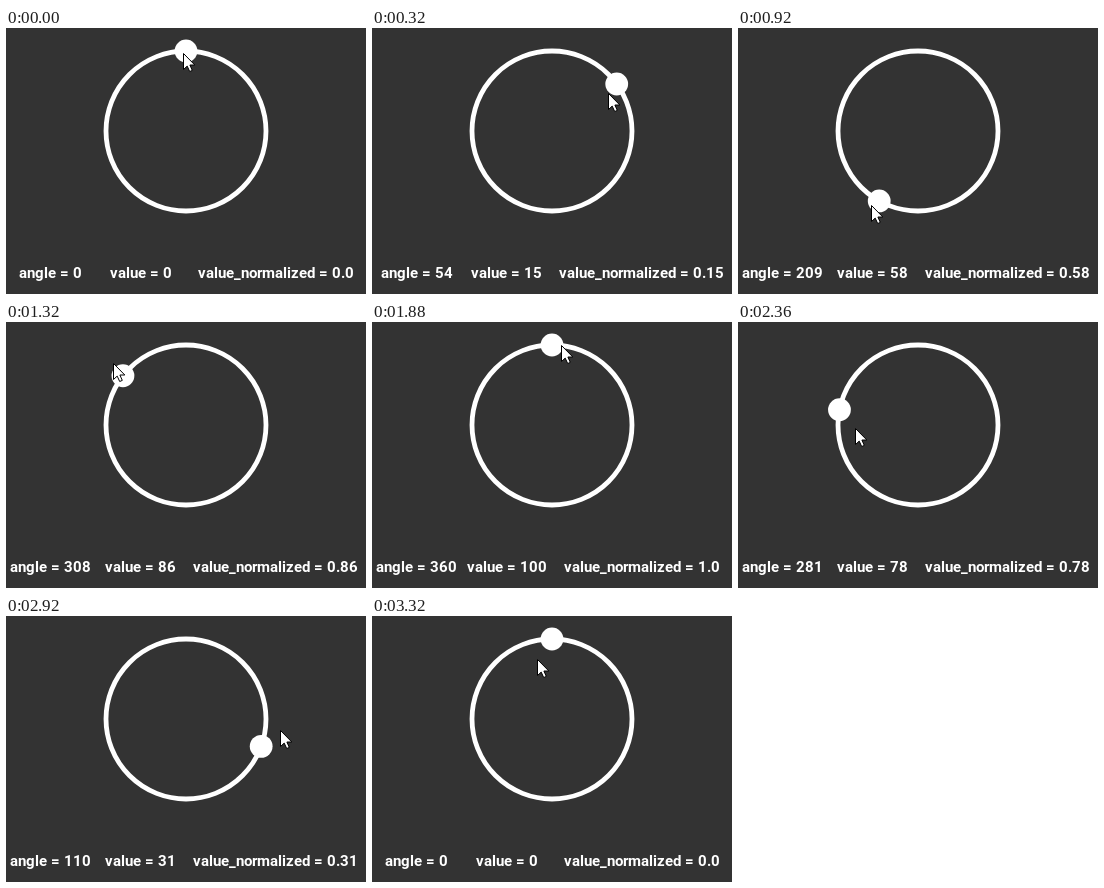
These frames come from a looping animation (360x266 px, 3.6 s). An HTML page with a canvas:

```html
<!DOCTYPE html>
<html lang="en">
<head>
<meta charset="utf-8">
<title>Circular slider</title>
<style>
  html, body { margin: 0; width: 360px; height: 266px; overflow: hidden; background: #333; }
  canvas { display: block; }
</style>
</head>
<body>
<canvas id="stage" width="360" height="266"></canvas>
<script>
const ctx = document.getElementById("stage").getContext("2d");
const LOOP = 3600, STEP = 40, TURN_BACK = 2120;
const CENTER = { x: 180, y: 103 }, RADIUS = 80;

const clamp = (v, low, high) => Math.min(high, Math.max(low, v));

// Linear path through [time, value] points.
function along(points, t) {
  const i = clamp(points.findIndex(p => p[0] > t), 1, points.length - 1);
  const [t0, v0] = points[i - 1], [t1, v1] = points[i];
  return v0 + (v1 - v0) * clamp((t - t0) / (t1 - t0), 0, 1);
}

// Clockwise drag with a soft start and stop, then a short nudge of the pointer.
function dragForward(t) {
  const u = clamp((t - 40) / 1552, 0, 1);
  const wave = Math.sin(2 * Math.PI * u);
  const angle = 360 * (u - 0.034 * wave);
  const nudge = clamp((t - 1840) / STEP, 0, 2);
  return {
    angle,
    turn: angle + 3 - 4.5 * Math.exp(-12 * u) + 4.2 * nudge,
    reach: 78 + 8 * u - 11.7 * wave - 5 * Math.min(nudge, 1)
  };
}

// Steady drag back, with the pointer ahead of the knob.
function dragBack(t) {
  const angle = clamp(354 - 0.305 * (t - TURN_BACK), 0, 360);
  const reach = along([[2080, 81], [2360, 62], [2920, 96], [3320, 85]], t);
  return { angle, turn: angle - 13.5, reach };
}

function polar(degrees, radius) {
  const rad = degrees * Math.PI / 180;
  return { x: CENTER.x + radius * Math.sin(rad), y: CENTER.y - radius * Math.cos(rad) };
}

function circle({ x, y }, radius) {
  ctx.beginPath();
  ctx.arc(x, y, radius, 0, Math.PI * 2);
}

// Centred text whose letters advance by whole pixels.
function label(text, center) {
  const widths = [...text].map(c => Math.round(ctx.measureText(c).width));
  let x = Math.floor(center - widths.reduce((sum, w) => sum + w) / 2);
  widths.forEach((width, i) => {
    ctx.fillText(text[i], x, 250);
    x += width;
  });
}

function drawPointer({ x, y }) {
  ctx.save();
  ctx.translate(Math.round(x) - 0.5, Math.round(y) + 0.5);
  const arrow = new Path2D("M0 0V16L3.7 12.6 6.2 18 8.8 16.9 6.4 11.5H11.3Z");
  ctx.fillStyle = "#fff";
  ctx.strokeStyle = "#000";
  ctx.fill(arrow);
  ctx.stroke(arrow);
  ctx.restore();
}

function decimal(value) {
  const rounded = Number(value.toFixed(2));
  return Number.isInteger(rounded) ? rounded + ".0" : String(rounded);
}

function draw(ms) {
  const t = Math.floor(ms / STEP) * STEP;
  const pose = t < TURN_BACK ? dragForward(t) : dragBack(t);
  const angle = Math.round(pose.angle);

  ctx.fillStyle = "#333";
  ctx.fillRect(0, 0, 360, 266);

  ctx.strokeStyle = ctx.fillStyle = "#fff";
  ctx.lineWidth = 4.8;
  circle(CENTER, RADIUS);
  ctx.stroke();
  circle(polar(angle, RADIUS), 11.4);
  ctx.fill();

  ctx.font = "bold 15px Roboto, sans-serif";
  label("angle = " + angle, 45);
  label("value = " + Math.round(angle / 3.6), 135);
  label("value_normalized = " + decimal(angle / 360), 270);

  ctx.lineWidth = 1;
  drawPointer(polar(pose.turn, pose.reach));
}

const start = performance.now();
function tick() {
  draw((performance.now() - start) % LOOP);
  requestAnimationFrame(tick);
}
tick();
</script>
</body>
</html>
```
